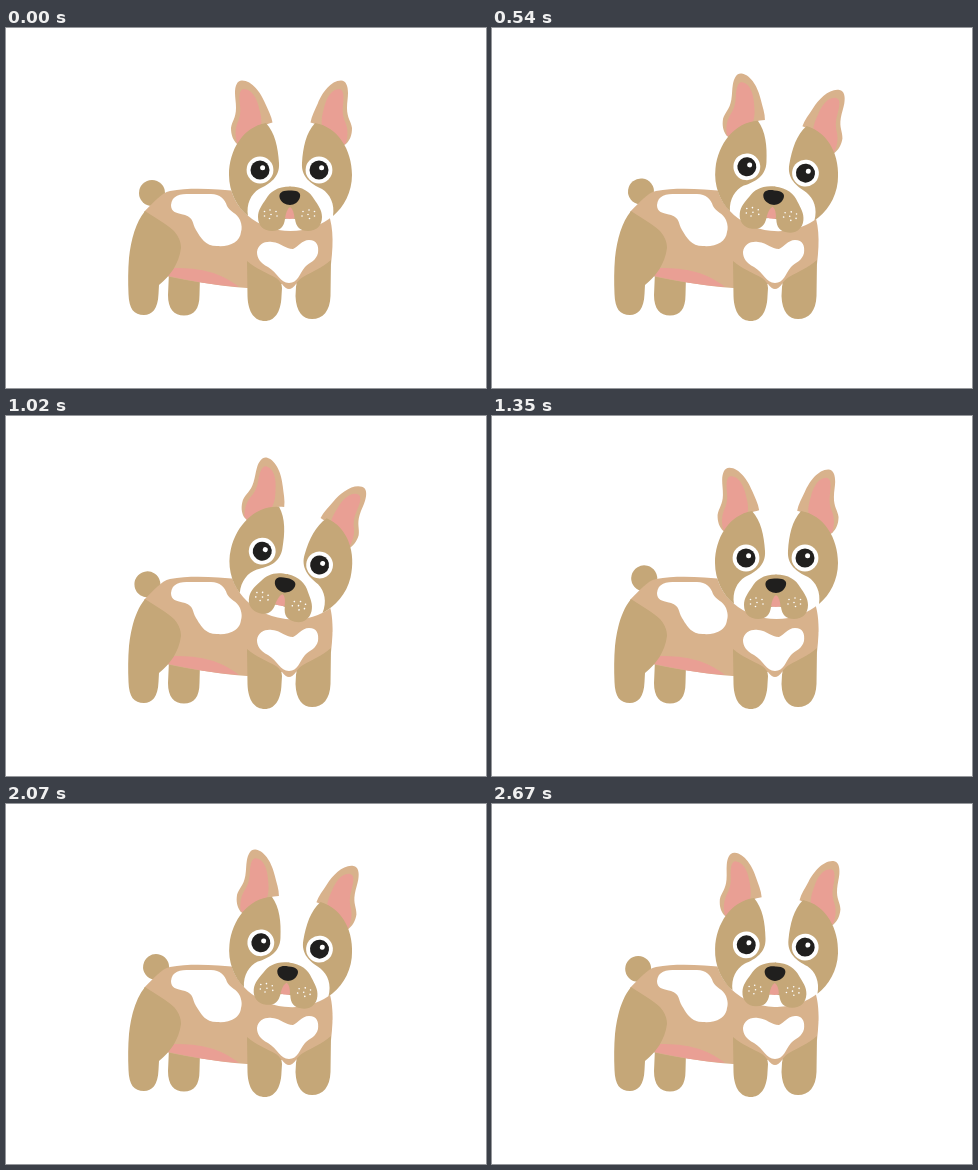
An HTML page for the animation above (2.7 s loop, 480 by 360 pixels).

```html
<!DOCTYPE html>
<html lang="en">
<head>
<meta charset="utf-8">
<title>Dog</title>
<style>
html, body { margin: 0; width: 100%; height: 100%; overflow: hidden; background: #fff; }
svg { display: block; width: 480px; height: 360px; }
.brown { fill: #c5a778; }
.tan { fill: #d8b28c; }
.pink { fill: #e99f94; }
.white { fill: #fff; }
.black { fill: #201f1e; }
</style>
</head>
<body>
<svg viewBox="0 0 480 360">
  <defs>
    <g id="ear">
      <path class="tan" d="M236 52.500C246 52.500 255 65 259 75C262 82 265.500 88 266.500 94.500C263 95.500 260 96 257 98L238 120L231 116C227 112 225 107 225 100C226 93 230 90 230 80C230 74 229 70 229 65C229 58 231 52.500 236 52.500Z"/>
      <path class="pink" d="M238 61C246 61 251 71 253 80C255 87 256 92 255 98L238 120L231 115C229 108 229 102 231 96C234 90 235 84 234 77C233 69 233 61 238 61Z"/>
    </g>
    <path id="patch" class="brown" d="M260 95C237 99 223 122 223 147C223 164 231 179 242 188C240 176 245 166 253 161C264 156 274 149 273 135C272 119 269 105 260 95Z"/>
    <g id="eye">
      <circle class="white" r="13.4"/>
      <circle class="black" r="9.5"/>
      <circle class="white" cx="2.6" cy="-2.2" r="2.5"/>
    </g>
    <path id="lobe" class="brown" d="M284.500 158.500C271 158.500 264 164 260 171C256 177 252 182 252 189C252 198 258 203 266 203C274 203 278 199 279 191L284.500 190Z"/>
    <g id="dots" class="white">
      <circle cx="258.500" cy="183.500" r=".8"/><circle cx="264" cy="182" r=".8"/>
      <circle cx="270" cy="183.500" r=".8"/><circle cx="258.500" cy="188" r=".8"/>
      <circle cx="265" cy="186.500" r=".8"/><circle cx="271" cy="188" r=".8"/>
      <circle cx="263.500" cy="190.500" r=".8"/>
    </g>
  </defs>

  <circle id="tail" class="brown" cx="146" cy="165" r="13"/>

  <path class="brown" d="M163 244L162 267C162 281 168 287.500 178 287.500C188 287.500 193.500 281 193.500 267L194 248Z"/>
  <path class="tan" d="M138 184C147 175 155 165 164 163C185 159 210 161 232 163L320 180C327 194 328 212 325 236L290 256Q283 266 276 256L241 260C215 258 190 254 160 248L150 210Z"/>
  <path class="pink" d="M168 240C195 240 214 244 233 259C208 257 185 253 162 248Z"/>
  <path class="brown" d="M139 183C149 190 161 196 168 203C173 209 175 214 175 220C173 236 164 248 153 257L152.500 266C152 281 146 287 138 287C128 287 123 281 122.500 266C122 254 122 242 123 230C125 211 130 194 139 183Z"/>
  <path class="white" d="M165 177C166 167 174 166 184 166L205 166C214 166 219 171 221 178C224 184 231 185 234 192C236 197 236 201 235 204C234 214 224 219 211 218C199 218 195 210 190 202C186 195 188 190 179 187C170 185 165 184 165 177Z"/>
  <path class="brown" d="M241 233C249 240 261 245 270 250Q276 254 276 260L275.500 268C275 285 268 293 259 293C249 293 242 285 241.500 268Z"/>
  <path class="brown" d="M325 232C317 239 306 244 297 249Q290 253 290 259L289.500 268C290 284 297 291 306 291C317 291 324 283 324.500 268Z"/>
  <path class="white" d="M283 255C274 255 272 245 262 239C254 235 251 230 251 224C252 216 259 213 266 214C276 215 279 221 287 221C292 219 296 212 303 212C311 212 313 218 312 225C310 233 304 234 299 239C293 246 292 255 283 255Z"/>

  <g id="ears">
    <use href="#ear"/>
    <use href="#ear" transform="matrix(-1 0 0 1 571 0)"/>
  </g>
  <g id="head">
    <ellipse class="white" cx="284.500" cy="149.500" rx="61" ry="53.500"/>
    <use href="#patch"/>
    <use href="#patch" transform="matrix(-1 0 0 1 569 0)"/>
    <use href="#eye" x="254" y="142"/>
    <use href="#eye" x="313" y="142"/>
    <use href="#lobe"/>
    <use href="#lobe" transform="matrix(-1 0 0 1 568 0)"/>
    <path class="pink" d="M284 179C281 181 280 185 279 190Q284 192 288.500 190C288 185 287 181 284 179Z"/>
    <path class="black" d="M284 162.500C292 162 295 165 294 169C293 174 288 177 284 177C280 177 274 174 273.500 169C273 165 276 162 284 162.500Z"/>
    <use href="#dots"/>
    <use href="#dots" transform="matrix(-1 0 0 1 567 0)"/>
  </g>
</svg>
<script>
const LOOP = 2700, CYCLE = 1500, STEP = 30;

// Each key is [ms, degrees]; every leg eases in and out.
const parts = [
  { id: "head", pivot: "284 148", keys: [[0, 0], [290, 6.2], [660, 6.2], [930, 17], [1240, 0], [1500, 0]] },
  { id: "ears", pivot: "284.5 132", keys: [[0, 0], [290, 9.5], [680, 9.5], [925, 20.7], [1265, 1], [1350, 1], [1500, 0]] },
  { id: "tail", pivot: "160 189", keys: [[0, 0], [290, -10], [680, 14], [850, -12], [1000, -12], [1350, 14], [1500, 0]] }
].map(p => ({ ...p, el: document.getElementById(p.id) }));

function angleAt(keys, t) {
  const i = keys.findIndex(k => k[0] > t);
  const [t0, a] = keys[i - 1], [t1, b] = keys[i];
  const p = (t - t0) / (t1 - t0);
  return a + (b - a) * p * p * (3 - 2 * p);
}

const start = performance.now();

function draw(now) {
  const time = Math.max(0, now - start) % LOOP;
  const t = Math.floor(time / STEP) * STEP % CYCLE;
  for (const { el, pivot, keys } of parts) {
    el.setAttribute("transform", `rotate(${angleAt(keys, t).toFixed(3)} ${pivot})`);
  }
  requestAnimationFrame(draw);
}
draw(start);
</script>
</body>
</html>
```
